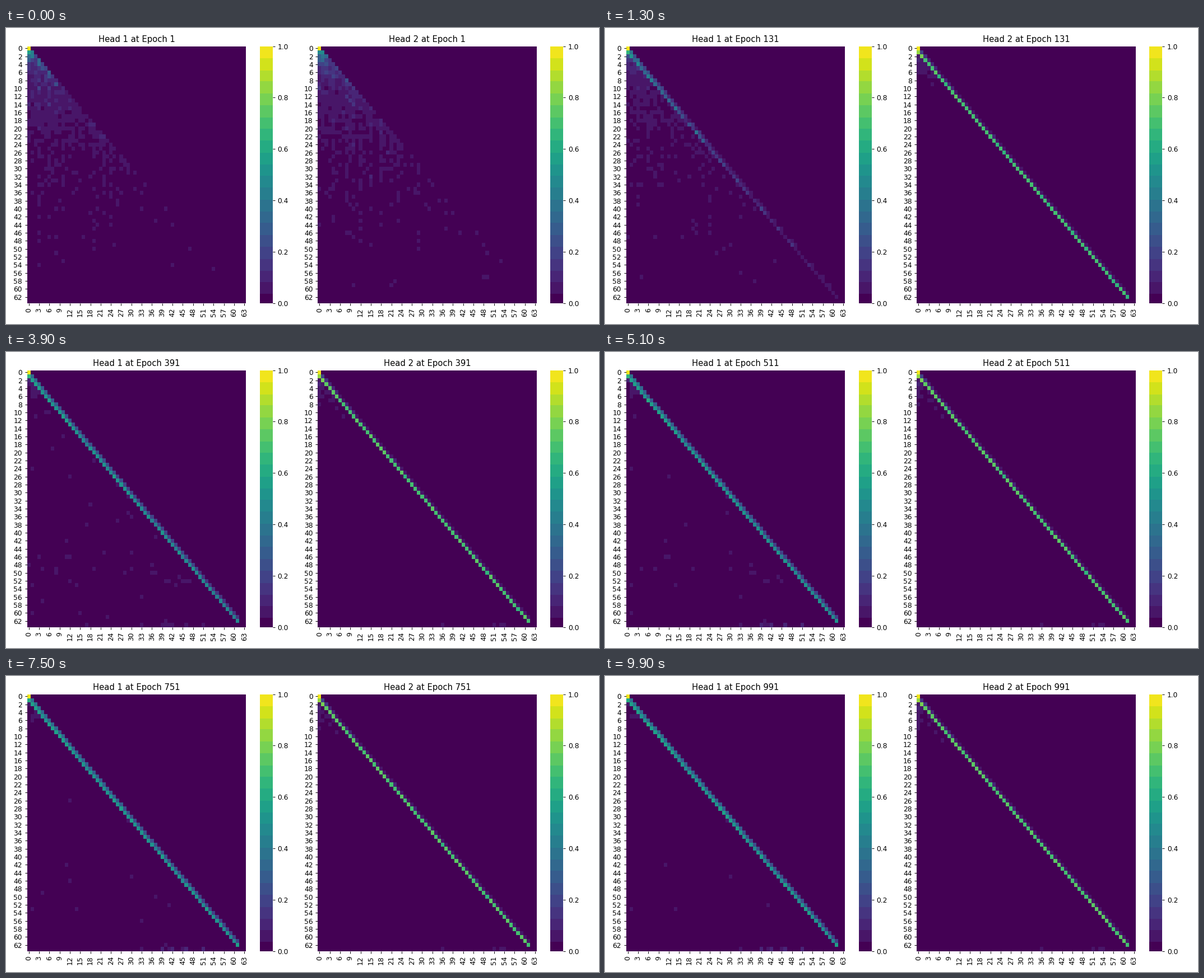
Recreate the animation shown at these times as a matplotlib script. Size 1058 by 529 pixels, loop 10000 ms.

```python
import numpy as np
import matplotlib.pyplot as plt
from matplotlib.animation import FuncAnimation
from matplotlib.colors import ListedColormap

plt.rcParams["font.family"] = "DejaVu Sans"

FRAMES, STEP_MS, EPOCH_STEP = 100, 100, 10
N = 64
ROW = np.arange(N)
GAP = ROW[:, None] - ROW[None, :]
CAUSAL = GAP >= 0


def banded_viridis(first=0.035, bands=21):
    """Viridis in even steps above a dark floor."""
    level = (np.arange(256) + 0.5) / 256
    step = (1 - first) / bands
    middle = first + (np.floor((level - first) / step) + 0.5) * step
    return ListedColormap(plt.get_cmap("viridis")(
        np.where(level < first, 0, middle)))


def sigmoid(x):
    return 1 / (1 + np.exp(-x))


def rise(epoch, scale):
    return 1 - np.exp(-epoch / scale)


class Head:
    """Causal attention that drifts from near uniform to the previous token."""

    stray_share = 0

    def __init__(self, seed):
        self.seed = seed
        rng = np.random.default_rng(seed)
        self.start, self.later = rng.normal(0, 0.34, (2, N, N))
        self.delay, self.gain = rng.normal(0, 1, (2, N))
        self.columns = 0.35 * (rng.random(N) < 0.2) - 0.07
        self.last_row = 0.1 * rng.random(N) * (rng.random(N) < 0.3)
        self.last_row *= (ROW > N / 2) & (ROW < N - 2)
        # Lone cells that linger before they fade
        stray = CAUSAL & (rng.random((N, N)) < self.stray_share)
        self.birth = np.where(stray, rng.uniform(60, 300, (N, N)), np.inf)
        self.death = 280 + rng.exponential(260, (N, N))

    def background(self, epoch, rng):
        turn = 1.5 * rise(epoch - 1, 250)
        logits = np.cos(turn) * self.start + np.sin(turn) * self.later
        logits = logits + self.columns * np.exp(-epoch / 300)
        logits += 0.25 * np.exp(-np.abs(GAP) / 2 - epoch / 100)
        logits += rng.normal(0, 0.05, (N, N))
        weights = np.exp(logits) * CAUSAL
        return weights / weights.sum(axis=1, keepdims=True)

    def matrix(self, epoch):
        rng = np.random.default_rng(self.seed * 1000 + epoch)
        prev, same = self.focus(epoch)
        prev = prev * (1 + rng.normal(0, 0.012, N))
        prev[[0, -1]] = 0
        same[[0, -2, -1]] = 0
        att = self.background(epoch, rng) * (1 - prev - same)[:, None]
        # Long rows spread thinner than the short ones
        att *= 1 - 0.1 * rise(ROW, 8)[:, None]
        att[ROW[1:], ROW[:-1]] += prev[1:]
        att[ROW, ROW] += same
        att[-1] = np.maximum(att[-1],
                             self.last_row * sigmoid((epoch - 330) / 50))
        alive = (self.birth < epoch) & (epoch < self.death)
        return np.maximum(att, 0.045 * alive)


class SlowHead(Head):
    stray_share = 0.04

    def focus(self, epoch):
        middle = 100 + 2.6 * ROW + 32 * self.delay
        on = sigmoid((epoch - middle) / 52) * rise(epoch - 1, 40)
        prev = on * (0.42 + 0.1 * rise(epoch, 300)) * (1 + 0.05 * self.gain)
        same = on * (0.10 + 0.2 * rise(epoch, 450)) * (1.2 - 0.5 * ROW / N)
        return prev, same


class FastHead(Head):
    def focus(self, epoch):
        middle = 52 + 0.3 * ROW + 4 * self.delay
        on = sigmoid((epoch - middle) / 11) * rise(epoch - 1, 20)
        prev = on * (0.66 + 0.05 * rise(epoch, 200)) * (1 + 0.025 * self.gain)
        same = on * (0.06 + 0.012 * self.delay)
        return prev, same


def add_panel(ax, cmap):
    mesh = ax.pcolormesh(np.zeros((N, N)), cmap=cmap, vmin=0, vmax=1)
    ax.set(xlim=(0, N), ylim=(N, 0))
    ax.spines[:].set_visible(False)
    bar = ax.figure.colorbar(mesh, ax=ax)
    bar.outline.set_linewidth(0)
    ax.set_xticks(ROW[::3] + 0.5, ROW[::3], rotation="vertical")
    ax.set_yticks(ROW[::2] + 0.5, ROW[::2])
    return mesh, ax.set_title("Head")


fig, axes = plt.subplots(1, 2, figsize=(12, 6), dpi=1058 / 12,
                         facecolor="white")
cmap = banded_viridis()
panels = [(head, *add_panel(ax, cmap))
          for head, ax in zip((SlowHead(11), FastHead(23)), axes)]
fig.tight_layout()


def update(i):
    epoch = 1 + EPOCH_STEP * i
    changed = []
    for k, (head, mesh, title) in enumerate(panels, 1):
        mesh.set_array(head.matrix(epoch))
        title.set_text(f"Head {k} at Epoch {epoch}")
        changed += [mesh, title]
    return changed


anim = FuncAnimation(fig, update, frames=FRAMES, interval=STEP_MS,
                     repeat=True, repeat_delay=0, blit=False)
plt.show()
```
